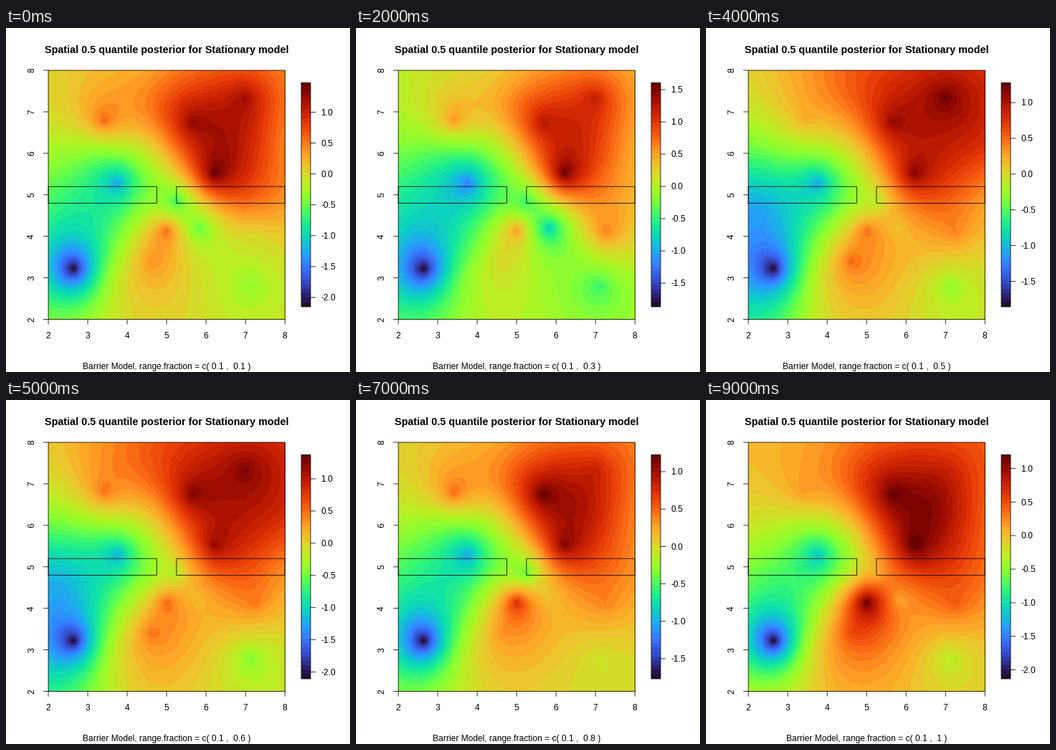
Write a matplotlib script that moves like this. It is 480 px wide and 480 px high and loops after 10 s.

```python
import numpy as np
import matplotlib
import matplotlib.pyplot as plt
from matplotlib.animation import FuncAnimation
from matplotlib.colors import ListedColormap
from matplotlib.patches import Rectangle

matplotlib.rcParams["font.family"] = "Liberation Sans"

SIZE, DPI = 480, 100
LEFT, RIGHT, TOP, BOTTOM = 59.04, 389.2, 59.04, 406.56
BAR_L, BAR_R, BAR_T, BAR_B = 412, 425, 76.5, 389
LEVELS, GRID = 50, 300

# Observations: x, y and height above zero, in percent of the colour range
OBS = dict(
    pool=(3.75, 5.3, -35), hill=(3.4, 6.8, 16), crown=(5.65, 6.75, 36),
    corner=(7.0, 7.35, 34), shore=(6.2, 5.52, 38), south=(5.0, 4.15, 15),
    gap=(5.25, 4.85, -15), dip=(5.82, 4.2, 4), east=(7.25, 4.1, 13),
    basin=(7.1, 2.8, -10), plain=(4.6, 3.4, 11))
SINK = (2.63, 3.22)

# Smooth surroundings: the rim grows with the spread of a step
RIM = [(4.5, 8, 9), (8, 8, 13), (8, 6.3, 13), (2, 4.8, -18), (2, 2, -12)]
INNER = [(8, 5, 11), (4.5, 5, -12), (3.6, 4, -16), (3.6, 3, -8), (3.2, 6, -11),
         (4.7, 6.2, 4), (5, 7, 20), (6.8, 6.5, 31), (7, 5, 19)]

gx, gy = np.meshgrid(np.linspace(2, 8, GRID), np.linspace(2, 8, GRID))


def surface(zero, spread, changes):
    """Interpolate all sites: pointed at observations, smooth elsewhere."""
    obs = [(x, y, changes.get(k, h)) for k, (x, y, h) in OBS.items()]
    obs.append((*SINK, -zero))
    rim = [(x, y, h * spread) for x, y, h in RIM]
    x, y, h = np.array(obs + rim + INNER).T
    sharp = np.where(np.arange(len(x)) < len(obs), 0.5, 0)
    reach = 0.7 * np.sqrt(spread)

    def basis(px, py):
        d = np.hypot(px[..., None] - x, py[..., None] - y)
        smooth = (1 + d / reach) * np.exp(-d / reach)
        return sharp * np.exp(-d / 0.4) + (1 - sharp) * smooth

    return zero + basis(gx, gy) @ np.linalg.solve(basis(x, y), h)


steps = {}


def step(n, low, high, spread=1.0, **changes):
    zero = -100 * low / (high - low)
    steps[n] = (low, high, surface(zero, spread, changes))


step(0, -2.151, 1.476, shore=41, east=1, dip=-15, gap=-19)
step(1, -1.89, 1.70, shore=47, dip=-22, gap=-19, plain=7)
step(3, -1.843, 1.511, shore=45, dip=-24, east=24, basin=-17, plain=5, gap=-8)
step(4, -1.856, 1.276, 1.9, corner=40, hill=7, gap=-5, plain=16)
step(6, -2.355, 1.47, 1.8, crown=38, shore=31, hill=20, basin=-16, gap=-7)
step(7, -1.768, 1.225, crown=41, corner=29, south=25, basin=-2)
step(9, -2.133, 1.203, corner=24, south=36, gap=2, hill=5, plain=16)

# The remaining steps lie halfway between their neighbours
for n in (2, 5, 8):
    steps[n] = tuple((a + b) / 2 for a, b in zip(steps[n - 1], steps[n + 1]))


fig = plt.figure(figsize=(SIZE / DPI, SIZE / DPI), dpi=DPI, facecolor="white")
ax = fig.add_axes([0, 0, 1, 1])
ax.axis("off")
# Turbo, slightly deepened
cmap = ListedColormap(plt.get_cmap("turbo")(np.linspace(0, 1, LEVELS))[:, :3] ** 1.2)


def px(n):
    return n * 72 / DPI


def line(x, y):
    return ax.plot(x, y, color="black", lw=px(0.8), solid_capstyle="butt",
                   snap=False)[0]


def label(x, y, s, size=12, ha="center", va="baseline", **kw):
    return ax.text(x, y, s, fontsize=px(size), ha=ha, va=va, **kw)


def box(x0, y0, x1, y1):
    ax.add_patch(Rectangle((x0, y0), x1 - x0, y1 - y0, fill=False, ec="black",
                           lw=px(0.8), snap=False, zorder=3))


def to_x(v):
    return LEFT + (v - 2) / 6 * (RIGHT - LEFT)


def to_y(v):
    return BOTTOM - (v - 2) / 6 * (BOTTOM - TOP)


def picture(data, top, *extent):
    return ax.imshow(data, cmap=cmap, vmin=0, vmax=top, origin="lower",
                     interpolation="nearest", aspect="auto", extent=extent)


field = picture(np.zeros((GRID, GRID)), 100, LEFT, RIGHT, BOTTOM, TOP)
picture(np.arange(LEVELS)[:, None], LEVELS - 1, BAR_L, BAR_R, BAR_B, BAR_T)

box(LEFT, TOP, RIGHT, BOTTOM)
box(BAR_L, BAR_T, BAR_R, BAR_B)
for a, b in ((2, 4.75), (5.25, 8)):
    box(to_x(a), to_y(5.2), to_x(b), to_y(4.8))

for v in range(2, 9):
    line([to_x(v)] * 2, [BOTTOM, BOTTOM + 7])
    label(to_x(v), 433, str(v))
    line([LEFT - 7, LEFT], [to_y(v)] * 2)
    label(42, to_y(v), str(v), rotation=90, ha="right", va="center")

label(224, 35, "Spatial 0.5 quantile posterior for Stationary model",
      14.4, weight="bold")
caption = label(224, 476, "")
marks = [(v, line([BAR_R, BAR_R + 7], [0, 0]),
          label(439, 0, f"{v:.1f}", ha="left"))
         for v in np.arange(-4, 4) / 2]

ax.set_xlim(0, SIZE)
ax.set_ylim(SIZE, 0)


def draw(n):
    low, high, z = steps[n]
    field.set_data(z)
    caption.set_text(f"Barrier Model, range.fraction = c( 0.1 ,  {(n + 1) / 10:g} )")
    for v, tick, text in marks:
        y = BAR_B - (v - low) / (high - low) * (BAR_B - BAR_T)
        tick.set_ydata([y, y])
        text.set_y(y + 4.3)
        shown = low <= v <= high
        tick.set_visible(shown)
        text.set_visible(shown)
    return [field, caption]


anim = FuncAnimation(fig, draw, frames=10, interval=1000, repeat=True,
                     repeat_delay=0, blit=False)
plt.show()
```
